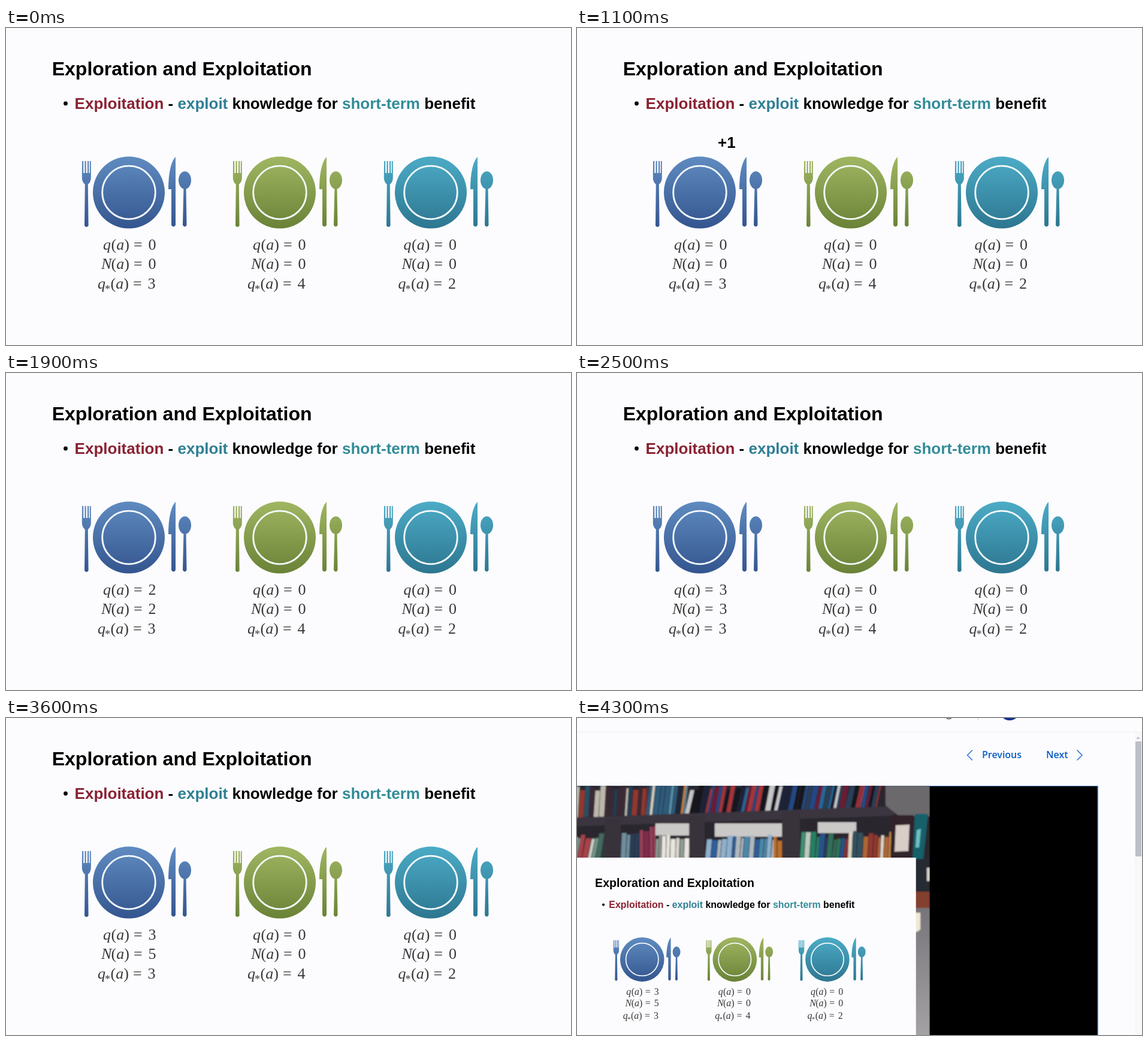
Write an HTML page that moves like this. It is 943x529 px and loops after 4400 ms.

```html
<!DOCTYPE html>
<html lang="en">
<head>
<meta charset="utf-8">
<title>Exploration and Exploitation</title>
<style>
  html, body { margin: 0; width: 100%; height: 100%; overflow: hidden; background: #fcfcfe; }
  svg { display: block; width: 943px; height: 529px; }
  text { white-space: pre; }
  .bold { font: bold 26px "Liberation Sans", Arial, sans-serif; }
  .title { font-size: 32px; }
  .math { font: 26px "Liberation Serif", "Times New Roman", serif; fill: #383838; }
  .math .it { font-style: italic; }
  .math .star { font-size: 18px; }
  .nav { font: 600 16px "Open Sans", "Noto Sans", sans-serif; fill: #0a5bc4; }
</style>
</head>
<body>
<svg viewBox="0 0 943 529">
  <defs>
    <clipPath id="photoClip"><path d="M-60 113H589V560H-60z"/></clipPath>
    <filter id="soft"><feGaussianBlur stdDeviation=".8"/></filter>
    <linearGradient id="wall" x1="0" y1="0" x2="0" y2="1">
      <stop offset="0" stop-color="#77757a"/><stop offset="1" stop-color="#aaa8aa"/>
    </linearGradient>
    <g id="cutlery">
      <path d="M127 222h2.2v20h2.3v-20h2.2v20h2.3v-20h2.2v20h1.6v-20h2v28q0 7-5 11l.8 69q-3.3 4-6.6 0l.8-69q-5-4-5-11z"/>
      <path d="M283 215V329q-3.5 5-7 0V269h-5C271 248 274 224 283 215z"/>
      <ellipse cx="298.5" cy="254" rx="10.5" ry="14.7"/>
      <path d="M296.5 264h4l1 65q-3 5-6.500 0z"/>
      <circle cx="205" cy="274.500" r="60"/>
      <circle cx="205" cy="274.500" r="44.300" fill="none" stroke="#f4f9fb" stroke-width="2.800"/>
    </g>
  </defs>

  <g id="page">
    <rect width="943" height="529" fill="#fcfcfe"/>
    <path d="M0 23.500H943" stroke="#eeeff3"/>
    <text class="nav" x="616" y="-2" style="font-size:18px;font-weight:400;fill:#333">g</text>
    <path d="M669.500 0V4" stroke="#c9cad2"/>
    <circle cx="722" cy="-13" r="17" fill="#12308c"/>
    <text class="nav" x="676" y="67">Previous</text>
    <text class="nav" x="783" y="67">Next</text>
    <path d="M660 53.500L651.500 62L660 70.500M834.500 53.500L843 62L834.500 70.500" fill="none" stroke="#2a6fd4" stroke-width="1.500"/>
    <rect x="931" y="24" width="12" height="505" fill="#f8f8fa"/>
    <path d="M933 35l3.500-4 3.500 4z" fill="#c4c4ca"/>
    <rect x="932" y="39" width="10" height="192" fill="#bebfc6"/>
    <rect x="0" y="113" width="870" height="416" fill="#5a8fd0"/>
    <rect x="0" y="114" width="868.500" height="415"/>
    <use href="#slide" transform="matrix(.6134 0 0 .6156 -17 234)"/>
  </g>

  <g id="windowed"><use href="#slide"/></g>

  <g id="fullscreen">
    <g id="slide">
      <g transform="matrix(1.6303 0 0 1.6244 27.700 -380.100)">
        <g clip-path="url(#photoClip)">
          <g id="photo" filter="url(#soft)"></g>
        </g>
      </g>
      <rect x="-100" y="-1.600" width="1050" height="900" fill="#fcfcfe"/>
      <text class="bold title" x="76.700" y="78.500">Exploration and Exploitation</text>
      <circle cx="99.500" cy="126" r="3.400"/>
      <text class="bold" x="114.600" y="135"><tspan fill="#8a2233">Exploitation</tspan> - <tspan fill="#2f7f94">exploit</tspan> knowledge for <tspan fill="#328c98">short-term</tspan> benefit</text>
      <g id="meals"></g>
      <text id="reward" class="bold" x="235" y="200"></text>
    </g>
  </g>
</svg>
<script>
const LOOP = 4400, FIRST_UPDATE = 1200, BEAT = 600, REWARD_TIME = 400;
const EXIT_START = 3650, EXIT_TIME = 450, PAGE_START = 4300;
const rewards = [1, 3, 5, 1, 5];
const $ = id => document.getElementById(id);

// Plates with their value estimates
const meals = [
  { x: 0, textX: 0, best: 3, colors: ['#5f8bc0', '#34558f'] },
  { x: 252, textX: 250, best: 4, colors: ['#a0b662', '#6a8237'] },
  { x: 504, textX: 501.5, best: 2, colors: ['#4cabc6', '#2d7690'] }
];
const equation = (x, y, symbol, value, id = '', shift = 0) => `
  ${symbol}<text class="math" x="${x + 175.500 + shift}" y="${y}">(<tspan class="it">a</tspan>)</text>
  <text class="math" x="${x + 213 + shift}" y="${y}">=</text>
  <text class="math" ${id && `id="${id}"`} x="${x + 237.500 + shift}" y="${y}">${value}</text>`;
const letter = (x, y, c) => `<text class="math" x="${x}" y="${y}"><tspan class="it">${c}</tspan></text>`;

$('meals').innerHTML = meals.map(({ x, textX, best, colors }, i) => `
  <linearGradient id="glaze${i}" gradientUnits="userSpaceOnUse" x1="0" y1="215" x2="0" y2="334">
    <stop offset="0" stop-color="${colors[0]}"/><stop offset="1" stop-color="${colors[1]}"/>
  </linearGradient>
  <use href="#cutlery" x="${x}" fill="url(#glaze${i})"/>
  ${equation(textX, 370, letter(textX + 162, 370, 'q'), 0, i ? '' : 'estimate')}
  ${equation(textX, 402, letter(textX + 159, 402, 'N'), 0, i ? '' : 'count')}
  ${equation(textX, 435, letter(textX + 153, 435, 'q') +
    `<text class="math" x="${textX + 165}" y="442"><tspan class="star">*</tspan></text>`, best, '', -1)}`).join('');

// Bookshelf
let seed = 7;
const random = () => (seed = seed * 16807 % 2147483647) / 2147483647;
const shape = (d, fill) => `<path d="${d}" fill="${fill}"/>`;
function books(x0, x1, height, base, lean, palette) {
  let out = '';
  for (let x = x0; x < x1;) {
    const w = Math.min(3 + random() * 6, x1 - x), h = height * (.75 + random() * .25);
    const color = palette[Math.floor(random() * palette.length)];
    out += shape(`M${x} ${base(x)}h${w}l${lean} ${-h}h${-w}z`, color);
    x += w + 1;
  }
  return out;
}
const boardY = x => 166 - .036 * x, floorY = () => 236;
const cool = ['#2d5f9c', '#8eb0cc', '#d2d6d8', '#4b88a8', '#aeb8c0', '#253b68'];
const pale = ['#dcd7cc', '#b3ad9f', '#e8e5de', '#8f9b94'];
const vivid = ['#a5343a', '#234985', '#1a2238', '#c4c6c8', '#20699a', '#6a1c34', '#2b4059', '#15181f'];

$('photo').innerHTML =
  shape('M-60 113H589V560H-60z', '#2b272f') +
  shape('M131 176h56v20h-56zM230 176h112v22h-112zM402 174h64v18h-64z', '#cbc8c8') +
  books(-20, 115, 56, boardY, 3, ['#2b4f64', '#233c54', '#92382f', '#bdb8ac', '#161d28', '#3a2c36']) +
  books(115, 180, 56, boardY, 6, ['#c8803f', '#558fa8', '#d0cdc0', '#2f5b7c', '#1f2a38']) +
  books(180, 500, 50, boardY, 9, vivid) +
  shape('M-20 167L530 147V163L-20 181z', '#3b3640') +
  books(-20, 46, 46, floorY, 7, ['#cfcfc8', '#71978a', '#a8424a', '#e2dfd8', '#45685f', '#2f3a3c']) +
  books(73, 105, 48, floorY, 2, ['#2a4a58', '#6f8e9f', '#2b3d57']) +
  books(105, 131, 56, floorY, 0, ['#82294a', '#4c4253', '#984058']) +
  books(131, 187, 42, floorY, 1, pale) +
  books(214, 328, 43, floorY, 3, cool) +
  books(328, 342, 40, floorY, 0, ['#d0aa38', '#bb7029']) +
  books(372, 402, 48, floorY, 3, ['#288063', '#3a9475', '#bccabd']) +
  books(402, 452, 44, floorY, 4, ['#25528a', '#32705a', '#8f3535', '#2b3e5e']) +
  books(452, 524, 48, floorY, 2, ['#b06535', '#dad5c4', '#91392f', '#33515f', '#c68a3c']) +
  shape('M46 168h27v70h-27zM187 163h26v75h-26zM342 157h30v80h-30z', '#38333b') +
  shape('M515 113H589V164H538L515 146z', '#6c696d') +
  shape('M524 162h38v76h-38z', '#33242a') +
  shape('M532 179l23-1-2 44-23 1z', '#d8cec7') +
  shape('M564 160h22l-8 75h-18z', '#15606a') +
  shape('M567 187l7-2-3 31h-6z', '#6fc0c4') +
  shape('M560 235H589V290H560z', '#272a31') +
  shape('M584 250h5v22h-5z', '#d4d1cb') +
  shape('M560 290H589V317H560z', '#84412f') +
  '<path d="M560 317H589V560H560z" fill="url(#wall)"/>' +
  shape('M560 325h13v28l-6 4h-7z', '#f0e9d6');

// Timeline
const show = (id, on) => $(id).setAttribute('visibility', on ? 'visible' : 'hidden');
const place = (id, x, y, sy) => $(id).setAttribute('transform', `matrix(1 0 0 ${sy} ${x} ${y})`);
function setText(id, value) {
  if ($(id).textContent !== String(value)) $(id).textContent = value;
}

function render(t) {
  const count = Math.max(0, Math.min(rewards.length, Math.floor((t - FIRST_UPDATE) / BEAT) + 1));
  const total = rewards.slice(0, count).reduce((sum, r) => sum + r, 0);
  const untilUpdate = FIRST_UPDATE + count * BEAT - t;
  setText('estimate', count ? total / count : 0);
  setText('count', count);
  setText('reward', count < rewards.length && untilUpdate <= REWARD_TIME ? '+' + rewards[count] : '');

  const p = Math.max(0, Math.min(1, (t - EXIT_START) / EXIT_TIME));
  const inPage = t >= PAGE_START;
  show('page', inPage);
  show('windowed', p > 0 && !inPage);
  place('windowed', 4.5, 115 + 29 * p, 1.0275 - .025 * p);
  place('fullscreen', 0, 28 * p, 1 - .025 * p);
  $('fullscreen').setAttribute('opacity', inPage ? 0 : Math.max(0, 1 - 1.14 * p));
}

const start = performance.now();
function tick() {
  render((performance.now() - start) % LOOP);
  requestAnimationFrame(tick);
}
tick();
</script>
</body>
</html>
```
